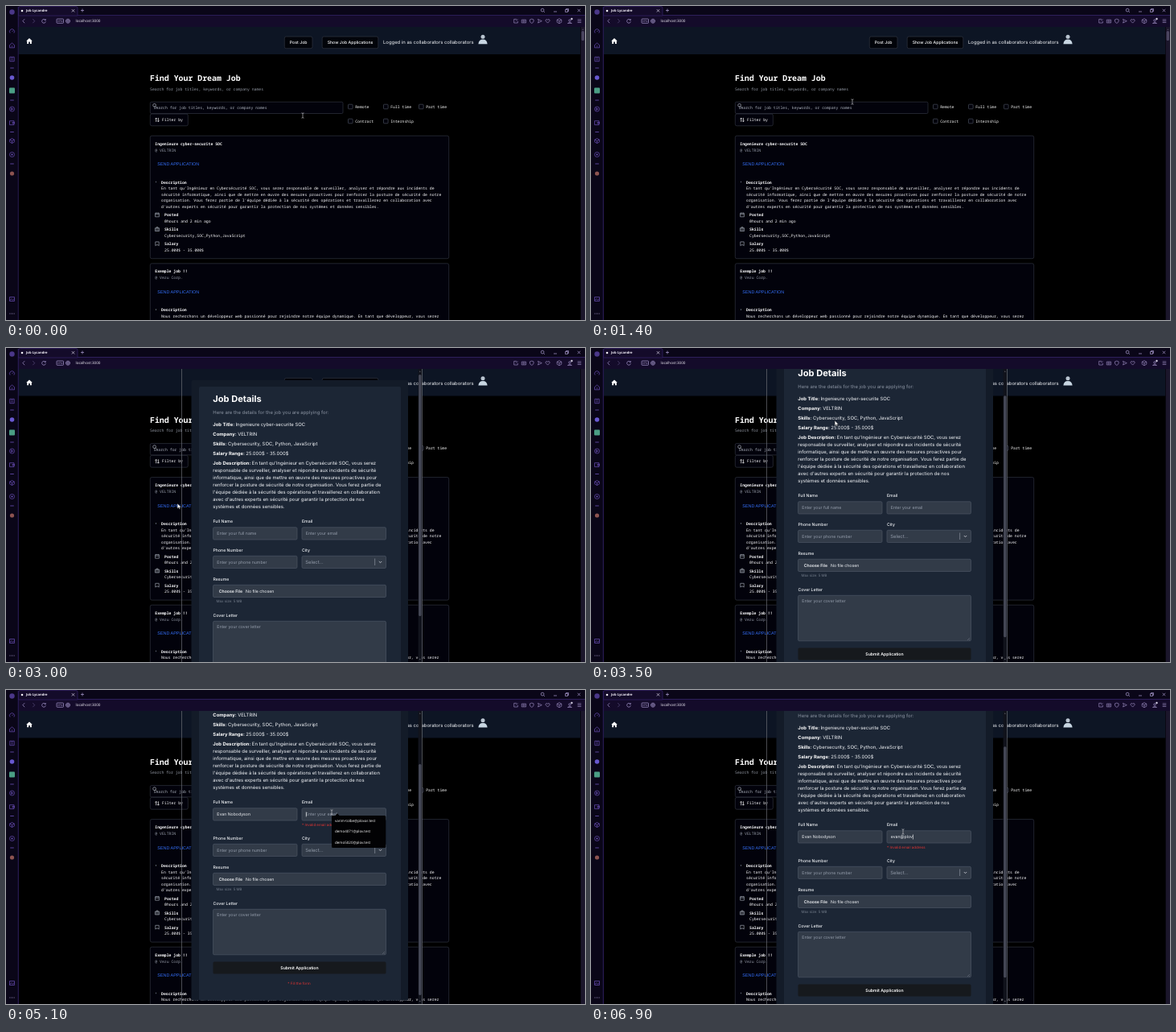
Animation of 720x390 px, one loop 7 s. Source, as an HTML page with a canvas:

```html
<!DOCTYPE html>
<html lang="en">
<head>
<meta charset="utf-8">
<title>Job board</title>
<style>
html, body { margin: 0; width: 100%; height: 100%; overflow: hidden; background: #000; }
canvas { display: block; }
</style>
</head>
<body>
<canvas id="stage" width="720" height="390"></canvas>
<script>
const ctx = document.getElementById('stage').getContext('2d');
const LOOP = 7000, MODAL_OPEN = 2850, SUBMITTED = 4930;

const MONO = '"Noto Sans Mono", monospace';
const SANS = 'Inter, sans-serif';
const UI = '"Open Sans", sans-serif';
const mono = { font: MONO, size: 4.81, weight: 500, color: '#fff' };
const monoBold = { ...mono, weight: 700 };
const monoDim = { ...mono, color: '#989eaa' };
const body = { font: SANS, size: 5.93, color: '#f4f6f9' };
const bodyBold = { ...body, size: 5.87, weight: 700, color: '#fff' };
const label = { font: SANS, size: 5.18, weight: 500, color: '#f4f6f9' };
const hint = { ...label, weight: 400, color: '#949dab' };
const small = { ...hint, size: 4.46, color: '#747d8b' };
const error = { ...small, color: '#e23433' };
const ui = { font: UI, size: 4.5, weight: 500, color: '#f4f1fa' };
const PURPLE = '#6a50b8', ICON = '#a99bd0', LINE = '#30343f';
const STRIP = '#0a0618', BAR = '#140b2a', EDGE = '#35246a', CARD = '#02020b';

// y is the optical middle of the line; returns the advance width
function text(s, x, y, style, align = 'left') {
  ctx.font = `${style.weight || 400} ${style.size}px ${style.font}`;
  ctx.textRendering = 'geometricPrecision';
  ctx.textAlign = align;
  ctx.fillStyle = style.color;
  ctx.fillText(s, x, y + style.size * 0.34);
  return ctx.measureText(s).width;
}

function box(x, y, w, h, fill, stroke, r = 0) {
  ctx.beginPath();
  ctx.roundRect(x, y, w, h, r);
  if (fill) { ctx.fillStyle = fill; ctx.fill(); }
  if (stroke) { ctx.strokeStyle = stroke; ctx.lineWidth = 0.7; ctx.stroke(); }
}

function disc(x, y, r, fill) {
  ctx.beginPath();
  ctx.arc(x, y, r, 0, 7);
  ctx.fillStyle = fill;
  ctx.fill();
}

function icon(d, x, y, stroke, width = 0.7, fill) {
  const p = new Path2D(d);
  ctx.save();
  ctx.translate(x, y);
  if (fill) { ctx.fillStyle = fill; ctx.fill(p); }
  if (stroke) { ctx.strokeStyle = stroke; ctx.lineWidth = width; ctx.stroke(p); }
  ctx.restore();
}

const shapes = {
  ring: 'M3 0A3 3 0 1 1 -3 0A3 3 0 1 1 3 0Z',
  dial: 'M-2.4 2A3 3 0 1 1 2.4 2M0 .5L1.4 -1',
  bag: 'M-3 -.5L0 -3L3 -.5V2.8H-3ZM-1 1H1',
  square: 'M-2.7 -2.7H2.7V2.7H-2.7Z',
  wallet: 'M-3 -2.3H2.5V2.6H-3ZM.5 -.6H3V1H.5Z',
  cube: 'M0 -3L2.8 -1.5V1.5L0 3L-2.8 1.5V-1.5ZM-2.8 -1.5L0 0L2.8 -1.5M0 0V3',
  picture: 'M-3 -2.5H3V2.5H-3ZM-3 1.5L-.5 -.3L1 1L3 -.5',
  search: 'M1.5 -.4A1.9 1.9 0 1 1 -2.3 -.4A1.9 1.9 0 1 1 1.5 -.4M1 1L2.5 2.5',
  cross: 'M-1.7 -1.7L1.7 1.7M1.7 -1.7L-1.7 1.7',
  plus: 'M-2 0H2M0 -2V2',
  back: 'M1.2 -2.5L-1.2 0L1.2 2.5',
  forward: 'M-1.2 -2.5L1.2 0L-1.2 2.5',
  reload: 'M2 -1.3A2.4 2.4 0 1 0 2.4 .6M2.3 -2.6V-1H.7',
  globe: 'M2.5 0A2.5 2.5 0 1 1 -2.5 0A2.5 2.5 0 1 1 2.5 0M-2.5 0H2.5M0 -2.5V2.5',
  edit: 'M1 -2.3H-2.3V2.3H2.3V0M0 0L2.4 -2.4',
  camera: 'M-2.6 -1.6H2.6V2.2H-2.6ZM1.1 .3A1.1 1.1 0 1 1 -1.1 .3A1.1 1.1 0 1 1 1.1 .3',
  shield: 'M0 -2.6L2.3 -1.8V.3Q2 2 0 2.7Q-2 2 -2.3 .3V-1.8Z',
  send: 'M-2.2 -2.3L2.6 0L-2.2 2.3L-1.3 0Z',
  heart: 'M0 2.4L-2.5 -.2Q-2.6 -2.2 -1.2 -2.2Q-.3 -2.2 0 -1.2Q.3 -2.2 1.2 -2.2Q2.6 -2.2 2.5 -.2Z',
  person: 'M1.3 -1A1.3 1.3 0 1 1 -1.3 -1A1.3 1.3 0 1 1 1.3 -1M-2.5 2.5Q0 -.4 2.5 2.5Z',
  menu: 'M-2.3 -1.8H2.3M-2.3 0H2.3M-2.3 1.8H2.3',
  calendar: 'M-2.4 -2H2.4V2.5H-2.4ZM-2.4 -.5H2.4M-1.2 -2.8V-1.5M1.2 -2.8V-1.5',
  briefcase: 'M-2.6 -1.5H2.6V2.3H-2.6ZM-1 -1.5V-2.6H1V-1.5M-1 -1.5V2.3M1 -1.5V2.3',
  note: 'M-2.2 2.4V-2.4H2.2V2.4L1 1.4H-1Z',
  sort: 'M-1.3 2.5V-2.3M-2.5 -1.1L-1.3 -2.4L-.1 -1.1M1.4 -2.5V2.3M.2 1.1L1.4 2.4L2.6 1.1',
  home: 'M0 -3.6L3.8 -.2H2.8V3.2H.9V.8H-.9V3.2H-2.8V-.2H-3.8Z',
  chevron: 'M-1.7 -.8L0 .9L1.7 -.8',
  arrow: 'M0 0V6.2L1.5 4.9L2.5 7L3.5 6.5L2.5 4.5H4.5Z',
  beam: 'M-1.5 -3.2Q0 -3.2 0 -2.4Q0 -3.2 1.5 -3.2M0 -2.6V2.6M-1.5 3.2Q0 3.2 0 2.4Q0 3.2 1.5 3.2'
};

// Eased interpolation through rows of [time, ...values]
function track(t, rows) {
  const i = rows.findIndex(r => r[0] > t);
  if (i < 0) return rows[rows.length - 1].slice(1);
  if (i === 0) return rows[0].slice(1);
  const a = rows[i - 1], b = rows[i];
  const u = (t - a[0]) / (b[0] - a[0]), k = u * u * (3 - 2 * u);
  return a.slice(1).map((v, j) => v + (b[j + 1] - v) * k);
}

const pageScroll = [[2000, 0], [2250, 75], [2400, 75], [2700, 0]];
const formScroll = [[3100, 0], [3400, 32], [4000, 32], [4400, 61], [SUBMITTED, 61], [5060, 76], [5200, 76], [5500, 48]];
const pointer = [
  [900, 369, 136], [1350, 325, 119], [1550, 325, 119], [1700, 186, 171], [1950, 256, 171],
  [2200, 295, 136], [2450, 295, 136], [2750, 214, 196], [3000, 214, 196], [3300, 304, 93],
  [3900, 304, 93], [4350, 378, 138], [4500, 378, 138], [4620, 310, 168], [4800, 310, 168],
  [4910, 365, 351], [5060, 405, 152], [5200, 405, 152], [5500, 388, 176]
];

const jobs = [
  {
    title: 'Ingenieure cyber-securite SOC', company: 'VELTRIN', posted: '0hours and 2 min ago',
    skills: 'Cybersecurity,SOC,Python,JavaScript', salary: '25.000$ - 35.000$',
    lines: [
      "En tant qu'Ingénieur en Cybersécurité SOC, vous serez responsable de surveiller, analyser et répondre aux incidents de",
      'sécurité informatique, ainsi que de mettre en œuvre des mesures proactives pour renforcer la posture de sécurité de notre',
      "organisation. Vous ferez partie de l'équipe dédiée à la sécurité des opérations et travaillerez en collaboration avec",
      "d'autres experts en sécurité pour garantir la protection de nos systèmes et données sensibles."
    ]
  },
  {
    title: 'Exemple job !!', company: 'Vezu Corp.', posted: '1 days and 7 hours ago',
    skills: 'MongoDB,JavaScript', salary: '20.000$ - 30.000$',
    lines: [
      'Nous recherchons un développeur web passionné pour rejoindre notre équipe dynamique. En tant que développeur, vous serez',
      "chargé de créer et d'optimiser des interfaces web, en répondant aux besoins spécifiques de nos clients. Vous travaillerez",
      'sur divers projets, allant des sites intranet et internet aux applications web et outils en ligne. Une maîtrise des',
      "langages HTML, CSS, JavaScript, MySQL et PHP est essentielle. Nous valorisons la créativité, l'innovation et la capacité",
      'à travailler en équipe. Si vous êtes prêt à relever des défis et à contribuer à notre succès, postulez dès maintenant!'
    ]
  }
];
const summary = [
  'responsable de surveiller, analyser et répondre aux incidents de sécurité',
  'informatique, ainsi que de mettre en œuvre des mesures proactives pour',
  'renforcer la posture de sécurité de notre organisation. Vous ferez partie de',
  "l'équipe dédiée à la sécurité des opérations et travaillerez en collaboration",
  "avec d'autres experts en sécurité pour garantir la protection de nos",
  'systèmes et données sensibles.'
];

function drawBrowser() {
  box(0, 0, 720, 11.5, STRIP);
  box(15, 11.5, 705, 14.5, BAR);
  box(89, 11, 631, 0.7, EDGE);
  box(15.6, 0.5, 73.4, 11.5, BAR, EDGE, [2, 2, 0, 0]);
  disc(20, 6, 1.3, '#f2f0f6');
  text('Job Lycandre', 25, 5.8, { ...ui, size: 4.15, weight: 700 });
  icon(shapes.cross, 83.5, 5.8, '#d8d2e6');
  icon(shapes.plus, 95, 5.5, ICON);
  icon(shapes.search, 667.5, 5.5, ICON);
  icon('M-2 1.5H2', 683, 5.5, ICON);
  icon('M-2 -1H1V2H-2ZM-1 -1V-2H2V1H1', 697.5, 5.5, ICON);
  icon(shapes.cross, 712.5, 5.5, ICON);

  icon(shapes.back, 22, 18.7, ICON);
  icon(shapes.forward, 34.5, 18.7, '#5c4f80');
  icon(shapes.reload, 47, 18.7, ICON);
  box(63, 16, 8.5, 5.3, null, ICON, 0.8);
  text('VPN', 67.2, 18.7, { ...ui, size: 3.3, color: ICON }, 'center');
  icon(shapes.globe, 77, 18.7, ICON);
  text('localhost:3000', 86.5, 18.8, { ...ui, size: 4.6 });
  ['edit', 'camera', 'shield', 'send', 'heart'].forEach((name, i) =>
    icon(shapes[name], 634 + i * 9.9, 18.7, ICON, 0.6));
  icon(shapes.cube, 688, 18.7, ICON, 0.6);
  icon(shapes.person, 701, 19, ICON, 0.6);
  disc(703.5, 16, 1.2, '#d8d2e6');
  icon(shapes.menu, 713, 18.7, ICON, 0.6);

  box(0, 0, 15, 390, STRIP);
  box(14.8, 1, 0.8, 389, EDGE);
  disc(7.5, 7.5, 3.2, '#4a3788');
  [['dial', 31.5], ['bag', 49], ['square', 66], ['ring', 128], ['wallet', 145], ['cube', 167.5], ['ring', 184.5], ['picture', 364]]
    .forEach(([name, y]) => icon(shapes[name], 7.5, y, PURPLE));
  icon('M-1 -1.3L1.4 0L-1 1.3Z', 7.5, 128, PURPLE);
  icon('M-1.2 -1.2H1.2M-1.2 .8H1.2', 7.5, 66, PURPLE);
  disc(7.5, 184.5, 1.1, PURPLE);
  disc(7.5, 89, 2.8, '#6858d0');
  box(4, 101.5, 7, 7, '#4a9d84', null, 1);
  disc(7.5, 208, 2.6, '#8c5350');
  [77, 117, 156.5, 196].forEach(y => box(5.2, y - 0.4, 4.6, 0.8, PURPLE));
  [5, 7.5, 10].forEach(x => disc(x, 382, 0.6, ICON));
}

function button(s, x, y, w) {
  box(x, y, w, 14.7, '#02040a', LINE, 2);
  text(s, x + w / 2, y + 7.4, { ...label, size: 5.2, color: '#fff' }, 'center');
}

function drawJob(job, top, selected) {
  const extra = (job.lines.length - 4) * 7.5;
  box(179.3, top, 371.4, 152.5 + extra, CARD, LINE, 2);
  if (selected > 0) box(185.3, top + 6, selected, 8, '#4552ac');
  text(job.title, 185.3, top + 9.7, monoBold);
  text('@ ' + job.company, 185.3, top + 17.8, monoDim);
  text('SEND APPLICATION', 188.3, top + 35.4, { font: '"Liberation Sans", sans-serif', size: 5.45, color: '#3570fa' });
  box(186, top + 56.5, 0.7, 1.6, '#8b94a2');
  text('Description', 193, top + 58, monoBold);
  job.lines.forEach((line, i) => text(line, 193, top + 65.6 + i * 7.5, mono));
  [['Posted', job.posted, 'calendar'], ['Skills', job.skills, 'briefcase'], ['Salary', job.salary, 'note']]
    .forEach(([name, value, shape], i) => {
      const y = top + 98.6 + extra + i * 18;
      icon(shapes[shape], 188, y - 0.5, '#b4bac4', 0.6);
      text(name, 197, y, monoBold);
      text(value, 197, y + 7.6, mono);
    });
}

function drawPage(t, scroll) {
  box(15.5, 26, 704.5, 364, '#000');
  ctx.save();
  ctx.beginPath();
  ctx.rect(15.5, 26, 699, 364);
  ctx.clip();
  ctx.translate(0, -scroll);

  box(15.5, 26, 699, 34, '#0d1524');
  icon(shapes.home, 29, 43.7, null, 0, '#fff');
  button('Post Job', 346.3, 38, 34.7);
  button('Show Job Applications', 393.2, 38, 69.6);
  text('Logged in as collaborators collaborators', 469, 45, body);
  disc(593, 38.3, 2.5, '#b9c4d0');
  icon('M-5.6 6Q-5.2 .4 0 .4Q5.2 .4 5.6 6Z', 593, 41.2, null, 0, '#c8d6e2');

  text('Find Your Dream Job', 179, 90, { ...monoBold, size: 9.9 });
  text('Search for job titles, keywords, or company names', 179, 103, monoDim);
  box(179.3, 119.2, 239.7, 14.3, CARD, LINE, 1.5);
  icon(shapes.search, 185, 123.7, '#c6cbd3', 0.6);
  text('Search for job titles, keywords, or company names', 183.6, 126.7, { ...mono, color: '#b0b6c1' });
  box(179.3, 134, 47, 14.8, CARD, LINE, 2);
  icon(shapes.sort, 188, 141.4, '#fff', 0.7);
  text('Filter by', 194, 141.3, mono);
  [['Remote', 425.5, 125], ['Full time', 469.5, 125], ['Part time', 513.5, 125], ['Contract', 425.5, 143], ['Internship', 469.5, 143]]
    .forEach(([name, x, y]) => {
      box(x, y - 2.8, 5.6, 5.6, CARD, '#474d59', 0.8);
      text(name, x + 8.7, y, mono);
    });

  const selected = t < 2600 ? track(t, [[1700, 0], [1950, 70.5]])[0] : 0;
  drawJob(jobs[0], 161.2, selected);
  drawJob(jobs[1], 319.8, 0);

  if (t >= 1980 && t < 2600) {
    box(181, 150.4, 78, 11.2, '#191034', null, 1.5);
    ['Search', 'Copy', 'Snapshot'].forEach((s, i) => {
      text(s, 193.5 + i * 25.8, 156, { ...ui, size: 4.3 }, 'center');
      if (i) box(180.5 + i * 25.8, 152.5, 0.5, 7, '#3b2c5e');
    });
    icon('M-2 0L0 1.8L2 0Z', 220, 161.5, null, 0, '#191034');
  }
  ctx.restore();

  box(714.7, 26, 5.3, 364, '#1b162b');
  if (t < MODAL_OPEN) {
    icon('M-1 .6L0 -.6L1 .6Z', 717.4, 29, null, 0, '#7a7490');
    box(715.6, 31 + scroll * 0.04, 3.4, 12, '#4b4560', null, 1.5);
  }
}

function field(name, x, y, hintText, value, h = 15.2, w = 104.5) {
  text(name, x, y, label);
  box(x, y + 7.3, w, h, '#323b48', '#4b5563', 1.5);
  const tall = h > 20;
  text(value || hintText, x + 4.8, y + (tall ? 14.3 : 15), value ? { ...hint, color: '#f0f2f5' } : hint);
}

function drawForm(t, scroll) {
  const failed = t >= SUBMITTED, shift = failed ? 9 : 0;
  const bottom = 437.5 + (failed ? 24 : 0);
  const name = 'Evan Nobodyson'.slice(0, Math.max(0, Math.floor((t - 4620) / 17)));
  const email = 'evan@plov'.slice(0, Math.max(0, Math.floor((t - 5700) / 125)));

  ctx.save();
  ctx.beginPath();
  ctx.rect(217, 26, 302, 364);
  ctx.clip();
  box(218, 26, 0.7, 364, '#6a6d75');
  box(517, 26, 0.7, 364, '#6a6d75');

  ctx.save();
  ctx.translate(0, -scroll);
  box(230.5, 40, 269.5, bottom - 40, '#131b28', null, 2);
  box(240, 48, 251, bottom - 48, '#1c2635', null, 2);
  text('Job Details', 257.3, 63, { ...bodyBold, size: 11.1 });
  text('Here are the details for the job you are applying for:', 257.3, 80, { ...body, color: '#8b94a2' });
  [['Job Title:', 'Ingenieure cyber-securite SOC', 95], ['Company:', 'VELTRIN', 107],
   ['Skills:', 'Cybersecurity, SOC, Python, JavaScript', 119], ['Salary Range:', '25.000$ - 35.000$', 131],
   ['Job Description:', "En tant qu'Ingénieur en Cybersécurité SOC, vous serez", 143]]
    .forEach(([key, value, y]) => {
      const w = text(key + ' ', 257.3, y, bodyBold);
      text(value, 257.3 + w, y, body);
    });
  summary.forEach((line, i) => text(line, 257.3, 152 + i * 9, body));

  field('Full Name', 257.5, 215.5, 'Enter your full name', name);
  field('Email', 368, 215.5, 'Enter your email', email);
  if (t >= 5040) {
    ctx.font = `400 ${hint.size}px ${SANS}`;
    box(372.9 + ctx.measureText(email).width, 227.4, 0.6, 6, '#fff');
  }
  if (failed) text('* Invalid email address', 368, 243.4, error);

  ctx.translate(0, shift);
  field('Phone Number', 257.5, 251, 'Enter your phone number');
  field('City', 368, 251, '');
  text('Select...', 372.3, 265.8, { ...hint, size: 5.9 });
  box(458.5, 261.5, 0.6, 8.5, '#9aa2ae');
  icon(shapes.chevron, 465.5, 265.8, '#c4c9d1', 0.9);
  field('Resume', 257.5, 287, '', '', 15.2, 215);
  text('Choose File', 264.7, 302, { ...label, weight: 600 });
  text('No file chosen', 298, 302, { ...label, weight: 400 });
  text('Max size: 5 MB', 261.5, 314.6, small);
  field('Cover Letter', 257.5, 332, 'Enter your cover letter', '', 56.5, 215);
  icon('M-2 1L1 -2M0 1L1 0', 470, 394, '#8b94a2', 0.4);
  box(257.5, 404.5, 215, 15, '#16191d', null, 1.5);
  text('Submit Application', 365, 412.2, { ...label, weight: 600, color: '#fff' }, 'center');
  if (failed) text('* Fill the form', 364.5, 431, error, 'center');
  ctx.restore();

  box(512.6, 26, 4.4, 364, '#11131c');
  icon('M-1 .6L0 -.6L1 .6Z', 514.8, 29, null, 0, '#85858f');
  icon('M-1 -.6L0 .6L1 -.6Z', 514.8, 386.5, null, 0, '#85858f');
  box(513.2, 33 + scroll * (failed ? 0.775 : 0.82), 3.2, failed ? 287 : 300, '#474a58', null, 1.5);
  ctx.restore();

  if (t >= 5060 && t < 5220) drawSuggestions();
}

function drawSuggestions() {
  icon('M-3 0L0 -3.2L3 0Z', 412, 156.5, null, 0, '#020204');
  box(405, 156, 67.3, 40, '#020204', null, 1.5);
  ['varim-tolbe@plovar.test', 'demo4071@plov.test', 'demo5020@plov.test']
    .forEach((s, i) => text(s, 409, 162.4 + i * 13.4, { ...ui, size: 4.5, color: '#fff' }));
}

function drawPointer(t) {
  const [x, y] = track(t, pointer);
  const beam = t < 1980 || (t > 4590 && t < 4820) || t > 5020;
  if (beam) icon(shapes.beam, x, y, '#d0d0d6', 0.6);
  else icon(shapes.arrow, x - 0.8, y - 2.8, '#222', 0.4, '#fff');
}

function frame(now) {
  const t = now % LOOP;
  const open = t >= MODAL_OPEN;
  drawPage(t, open ? 0.6 : track(t, pageScroll)[0]);
  if (open) drawForm(t, track(t, formScroll)[0]);
  drawBrowser();
  drawPointer(t);
  requestAnimationFrame(frame);
}
requestAnimationFrame(frame);
</script>
</body>
</html>
```
